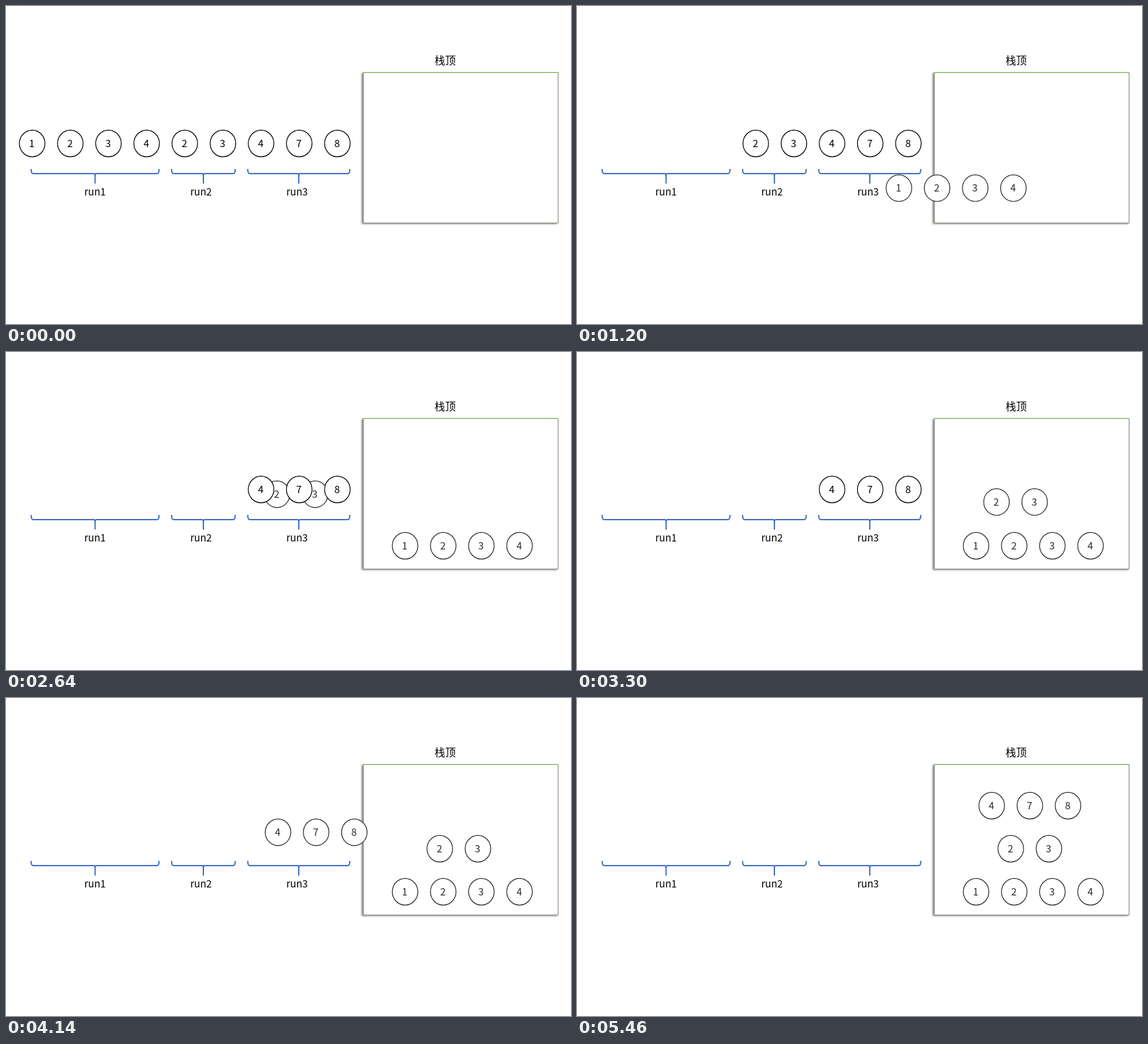
An HTML page that plays this animation: 853x480 px, repeating every 5.52 s.

```html
<!DOCTYPE html>
<html lang="zh">
<head>
<meta charset="utf-8">
<style>
  html, body { margin: 0; width: 100%; height: 100%; overflow: hidden; background: #fff; }
  svg { display: block; width: 853px; height: 480px; }
  text { font: 15px "Noto Sans CJK SC", "Noto Sans CJK", "Noto Sans CJK JP", "Noto Sans", sans-serif; text-anchor: middle; }
  .title { font-size: 16px; }
  .brace { fill: none; stroke: #4472c4; stroke-width: 2; }
  .ball { fill: #fff; stroke: #000; stroke-width: 1.2; }
  .moved .ball { stroke: #2b2b2b; }
  .moved text { fill: #2b2b2b; }
  .box { fill: #fff; filter: drop-shadow(-1.5px 1.5px 1.5px rgba(0, 0, 0, .5)); }
  .edge { fill: none; stroke: #7f8c78; }
  .top { stroke: #70ad47; }
</style>
</head>
<body>
<svg id="stage" viewBox="0 0 853 480">
  <text class="title" x="663" y="87.5">栈顶</text>
  <rect class="box" x="539" y="100" width="295" height="228"/>
  <path class="edge" d="M539.5 100V327.5H833.5V100"/>
  <path class="edge top" d="M539 100.5H834"/>
</svg>
<script>
const LOOP = 5520, STEP = 60, MOVE = 1620;
const runs = [
  { digits: [1, 2, 3, 4], first: 0, brace: [38, 231], label: 134.5, start: 101, dx: 563, dy: 85 },
  { digits: [2, 3], first: 4, brace: [250, 346], label: 294.5, start: 1951, dx: 385, dy: 20 },
  { digits: [4, 7, 8], first: 6, brace: [365, 519], label: 439.5, start: 3767, dx: 241, dy: -45 },
];
const stage = document.getElementById("stage");

function add(parent, tag, attrs, text = "") {
  const node = document.createElementNS("http://www.w3.org/2000/svg", tag);
  for (const key in attrs) node.setAttribute(key, attrs[key]);
  node.textContent = text;
  return parent.appendChild(node);
}

function bracePath(left, right) {
  const mid = (left + right) / 2;
  return `M${left} 246Q${left} 253 ${left + 3} 253H${mid - 2}Q${mid} 253 ${mid} 257V268` +
         `V257Q${mid} 253 ${mid + 2} 253H${right - 3}Q${right} 253 ${right} 246`;
}

runs.forEach((run, i) => {
  add(stage, "path", { class: "brace", d: bracePath(...run.brace) });
  add(stage, "text", { x: run.label, y: 286 }, "run" + (i + 1));
});

for (const run of runs) {
  run.group = add(stage, "g", {});
  run.digits.forEach((digit, i) => {
    const x = 39.5 + 57.6 * (run.first + i);
    add(run.group, "ellipse", { class: "ball", cx: x, cy: 207.5, rx: 19.3, ry: 20.1 });
    add(run.group, "text", { x: x - 0.5, y: 213 }, digit);
  });
}

// Constant acceleration to the midpoint, then constant deceleration.
function ease(u) {
  u = Math.min(1, Math.max(0, u));
  return u < 0.5 ? 2 * u * u : 1 - 2 * (1 - u) ** 2;
}

function draw(now) {
  const time = Math.floor((now % LOOP) / STEP) * STEP;
  for (const { group, start, dx, dy } of runs) {
    const p = ease((time - start) / MOVE);
    group.setAttribute("transform", `translate(${dx * p} ${dy * p})`);
    group.classList.toggle("moved", p > 0);
  }
  requestAnimationFrame(draw);
}
draw(0);
</script>
</body>
</html>
```
